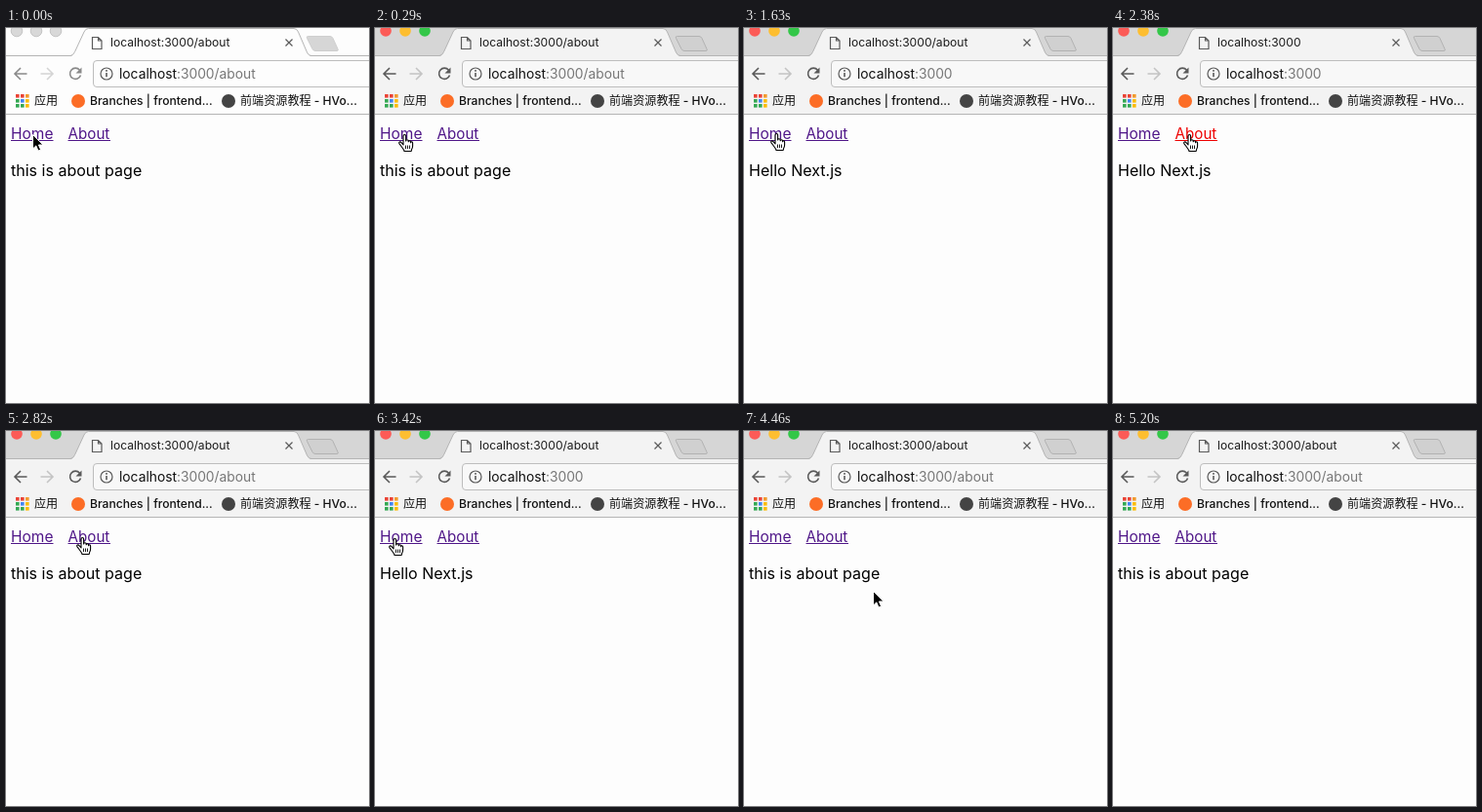
An HTML page for the animation above (5650 ms loop, 372 by 385 pixels).

```html
<!DOCTYPE html>
<html lang="zh-CN">
<head>
<meta charset="utf-8">
<title>Client-side routing</title>
<style>
html, body { margin: 0; width: 100%; height: 100%; overflow: hidden; background: #fdfdfd; }
svg { display: block; font-family: Inter, "Noto Sans CJK SC", "Noto Sans CJK", sans-serif; }
.strip { fill: #d6d6d6; }
.bar { fill: #f3f3f3; }
.field { fill: #f8f8f8; stroke: #bdbdbd; }
.plus { fill: #d0d0d0; stroke: #b2b2b2; }
.edge { stroke: #b4b4b4; fill: none; }
.icon { fill: none; stroke: #5a5a5a; stroke-width: 1.6; }
.thin { stroke-width: 1.2; }
.small { font-size: 12.1px; fill: #1c1c1c; }
.mark { font-weight: 500; fill: #111; }
.link { fill: #4f1688; stroke: none; }
.red { fill: #e00; }
.idle .strip, .idle .bar { fill: #fdfdfd; }
.idle .field { fill: #fdfdfd; }
.idle .light { fill: #d8d8d8; stroke: #c4c4c4; }
.idle .plus { fill: #d6d6d6; stroke: #cfcfcf; }
.idle .nav { opacity: .7; }
</style>
</head>
<body>
<svg id="stage" width="372" height="385" viewBox="0 0 372 385">
  <rect width="372" height="385" fill="#fdfdfd"/>
  <rect class="strip" width="372" height="29"/>
  <circle class="light" cx="11" cy="3" r="5.8" fill="#fc5b57"/>
  <circle class="light" cx="31" cy="3" r="5.8" fill="#fdbe30"/>
  <circle class="light" cx="51" cy="3" r="5.8" fill="#33c748"/>
  <path class="plus" d="M309.500 8.500H332q2 0 3 2l5 11q1 2-1 2H317q-2 0-3-2l-5.500-11q-1-2 1-2Z"/>

  <rect class="bar" y="29" width="372" height="59"/>
  <path class="edge" d="M0 28.500H372"/>
  <path class="bar" d="M66 29q3-.5 4.500-4L80 4q1.500-3.500 4.500-3.500H295q3 0 4.500 3.500l9 21q1.500 3.500 4.500 4Z"/>
  <path class="edge" d="M66 28.500q3-.5 4.500-4L80 4q1.500-3.500 4.500-3.500H295q3 0 4.500 3.500l9 21q1.500 3.500 4.500 3.500"/>
  <path class="icon thin" d="M88.500 9.500h6l3.500 3.500v8.500h-9.500ZM94.500 9.500v3.500h3.500"/>
  <text id="tab" class="small" x="107" y="19"></text>
  <path class="icon thin" d="M286.500 11.500l7 7m0-7l-7 7"/>

  <g class="nav">
    <path class="icon" d="M21.500 47H9M15 41l-6 6 6 6"/>
    <path class="icon" style="stroke:#c4c4c4" d="M35.500 47H48M42 41l6 6-6 6"/>
    <path class="icon" d="M75.500 43.200A5.600 5.600 0 1 0 76.500 48.500"/>
    <path fill="#5a5a5a" d="M77.500 40.500v6h-6Z"/>
  </g>
  <rect class="field" x="89.500" y="33.500" width="300" height="27" rx="3.500"/>
  <circle class="icon thin" cx="103" cy="47" r="6"/>
  <path class="icon" d="M103 46v4.200M103 43v1.700"/>
  <text x="116" y="52" font-size="13.8" fill="#111">localhost<tspan id="path" fill="#777"></tspan></text>

  <g id="apps"></g>
  <text class="small mark" x="29" y="79">应用</text>
  <circle cx="74" cy="75" r="7" fill="#fc6d26"/>
  <text class="small mark" x="86" y="79">Branches | frontend...</text>
  <circle cx="228" cy="75" r="7" fill="#444"/>
  <text class="small mark" x="240" y="79">前端资源教程 - HVo...</text>
  <path class="edge" d="M0 88.500H372"/>

  <g id="home" class="link" font-size="15.5"><text x="5" y="114">Home</text><rect x="5" y="115" width="43.500" height="1"/></g>
  <g id="about" class="link" font-size="15.2"><text x="63.500" y="114">About</text><rect x="63.500" y="115" width="43.500" height="1"/></g>
  <text id="body" x="5" y="152" font-size="16.050"></text>

  <path id="arrow" fill="#000" stroke="#fff" d="M.5.5V15l3.300-3.100 2.200 5.200 2.600-1.100-2.200-5h4.600Z"/>
  <g id="hand" stroke="#000" stroke-width="1.1" stroke-linejoin="round">
    <path fill="#fff" d="M5 11V2q0-1.500 1.300-1.500T7.600 2v5q0-1.200 1.300-1.200t1.300 1.200v.8q0-1 1.200-1t1.200 1.100v.8q0-.9 1-.9t1 1.200V12q0 2-1 3.500l-.4 2H6l-.4-1.300Q4.500 14.500 3 12.500L.8 9.600Q.3 8.500 1.200 8t2 .8Z"/>
    <path d="M7.500 11.500v3.500M9.500 11.500v3.500M11.500 11.500v3.500" stroke-width=".9"/>
  </g>
</svg>
<script>
const LOOP = 5650;
const $ = id => document.getElementById(id);

const appColors = ["#ea4335", "#ea4335", "#f29a2e", "#34a853", "#4285f4", "#fbbc05", "#34a853", "#34a853", "#fbbc05"];
$("apps").innerHTML = appColors.map((c, i) =>
  `<rect x="${10 + i % 3 * 5}" y="${68 + Math.floor(i / 3) * 5}" width="3.6" height="3.6" fill="${c}"/>`).join("");

// Each track lists [start time, value...]; a value holds until the next start.
const cursor = [
  [0, "arrow", 27, 109], [290, "hand", 24, 109], [890, "hand", 20, 109],
  [1630, "hand", 27, 108], [1780, "hand", 42, 108], [1930, "hand", 62, 109], [2080, "hand", 72, 109],
  [2970, "hand", 48, 110], [3120, "hand", 14, 110],
  [3570, "hand", 46, 110], [3720, "hand", 75, 109],
  [4310, "arrow", 181, 166], [4460, "arrow", 132, 164], [4610, "arrow", 222, 293],
  [4750, "arrow", 232, 317], [4900, "arrow", 253, 361], [5050, "arrow", 266, 372], [5200, "none", 0, 0]
];
const page = [[0, "about"], [1630, "home"], [2680, "about"], [3420, "home"], [4010, "about"]];
const title = [[0, "about"], [1780, "home"], [2820, "about"], [3570, "home"], [4160, "about"]];
const pressed = [
  [0, ""], [1190, "home"], [1330, ""], [2380, "about"], [2530, ""],
  [3270, "home"], [3420, ""], [3870, "about"], [4010, ""]
];

const at = (track, t) => track.findLast(step => step[0] <= t).slice(1);
const port = name => name === "about" ? ":3000/about" : ":3000";

function draw(now) {
  const t = now % LOOP;
  const [shape, x, y] = at(cursor, t);
  const [shown] = at(page, t);
  const [down] = at(pressed, t);

  $("stage").classList.toggle("idle", t < 150);
  $("tab").textContent = "localhost" + port(at(title, t)[0]);
  $("path").textContent = port(shown);
  $("body").textContent = shown === "about" ? "this is about page" : "Hello Next.js";
  for (const id of ["home", "about"]) $(id).classList.toggle("red", id === down);
  for (const id of ["arrow", "hand"]) {
    $(id).setAttribute("transform", `translate(${x} ${y})`);
    $(id).setAttribute("visibility", id === shape ? "visible" : "hidden");
  }
}

const start = performance.now();
function tick() {
  draw(performance.now() - start);
  requestAnimationFrame(tick);
}
tick();
</script>
</body>
</html>
```
